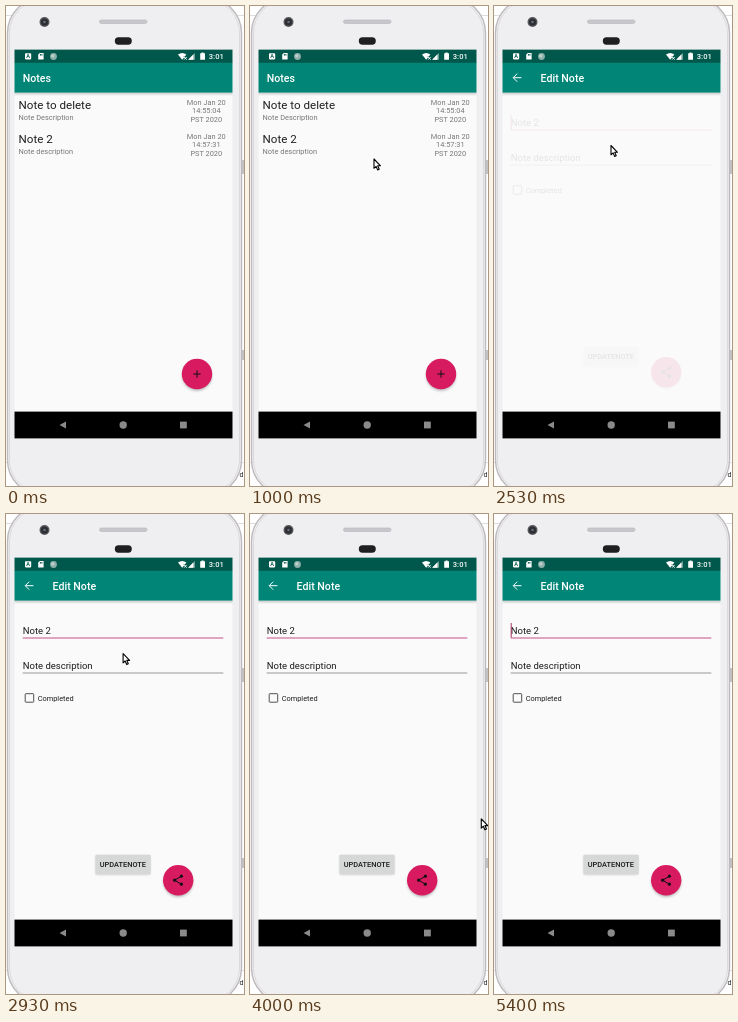
An HTML page that plays this animation: 238x480 px, repeating every 5.47 s.

```html
<!DOCTYPE html>
<html lang="en">
<head>
<meta charset="utf-8">
<title>Notes</title>
<style>
  html, body { margin: 0; width: 100%; height: 100%; overflow: hidden; background: #fff; }
  svg { display: block; width: 238px; height: 480px; font-family: Roboto, "Noto Sans", sans-serif; }
  .bar { font-size: 10.6px; font-weight: 500; fill: #fff; }
  .head { font-size: 11.6px; fill: #202020; }
  .small { font-size: 7.4px; fill: #777; }
  .mid { text-anchor: middle; }
  .field { font-size: 9.5px; fill: #1c1c1c; }
  .dark { fill: #1c1c1c; }
  .line { fill: none; stroke-width: 1; }
</style>
</head>
<body>
<svg viewBox="0 0 238 480">
  <defs>
    <filter id="soft" x="-50%" y="-50%" width="200%" height="200%"><feGaussianBlur stdDeviation="1.4"/></filter>
    <linearGradient id="drop" x2="0" y2="1">
      <stop stop-opacity=".2"/>
      <stop offset="1" stop-opacity="0"/>
    </linearGradient>
    <g id="fab">
      <circle cy="2" r="14.5" fill="#000" opacity=".3" filter="url(#soft)"/>
      <circle r="15.2" fill="#d81b60"/>
    </g>
  </defs>

  <!-- desktop behind the phone -->
  <path class="line" stroke="#ddd" d="M0 9.5H12M225 9.5H238M0 456.5H8M230 456.5H238"/>
  <path class="line" stroke="#888" d="M237 154V168M237 344V354"/>
  <text x="233.5" y="471" font-size="7" fill="#222">d</text>

  <!-- phone -->
  <rect x="1.5" y="-8" width="234" height="497" rx="35" fill="#efeff1" stroke="#bdb9bd" stroke-width="1.4"/>
  <rect x="3.5" y="-6" width="230" height="493" rx="33" fill="none" stroke="#dcd9dd"/>
  <rect x="93.5" y="14" width="47.5" height="3.4" rx="1.7" fill="#c9c9cd" stroke="#b2b2b6" stroke-width=".6"/>
  <circle cx="38.5" cy="16" r="5" fill="#58585c"/>
  <circle cx="38.5" cy="16" r="3.6" fill="#2c2e34"/>
  <circle cx="38.5" cy="16" r="1.3" fill="#666b78"/>
  <rect x="108.8" y="31.3" width="17" height="7.4" rx="3.7" fill="#1f1f22"/>

  <!-- screen -->
  <rect x="8.5" y="43.6" width="218" height="388.8" fill="#fafafa"/>
  <rect x="8.5" y="86.5" width="218" height="3.5" fill="url(#drop)"/>
  <rect x="8.5" y="43.6" width="218" height="13.4" fill="#00574b"/>
  <rect x="8.5" y="56.8" width="218" height="29.8" fill="#008577"/>
  <rect x="8.5" y="405.6" width="218" height="26.8" fill="#000"/>
  <path d="M60 415.5V422.5L53.5 419Z" fill="#8a8a8a"/>
  <circle cx="117.2" cy="419" r="3.7" fill="#8a8a8a"/>
  <rect x="174" y="415.6" width="6.8" height="6.8" fill="#8a8a8a"/>

  <!-- status icons -->
  <rect x="19" y="47.2" width="6.2" height="6.2" rx=".8" fill="#fff"/>
  <text class="mid" x="22.1" y="52.4" font-size="5.5" font-weight="700" fill="#00574b">A</text>
  <path d="M33.8 47H37.6V53.6H32.2V48.6Z" fill="#fff"/>
  <path class="line" stroke="#00574b" stroke-width=".6" d="M34.4 48V49.6M35.9 48V49.6"/>
  <circle cx="47.5" cy="50.5" r="3.4" fill="#8fb0aa"/>
  <circle cx="46.8" cy="49.8" r="1.6" fill="#bfd2ce"/>
  <path d="M172 48.6Q176.2 45.4 180.4 48.6L176.2 53.8Z" fill="#fff"/>
  <path class="line" stroke="#00574b" stroke-width="2" d="M178 50.5L181 54"/>
  <path class="line" stroke="#fff" stroke-width=".8" d="M178.2 51L180.6 53.6M180.6 51L178.2 53.6"/>
  <path d="M188.8 47V53.8H182.2Z" fill="#8fb0aa"/>
  <path d="M187.3 48.5V53.8H182.2Z" fill="#fff"/>
  <path d="M195.6 46.4H197.6V47.2H199V53.8H194.2V47.2H195.6Z" fill="#fff"/>
  <text x="202.8" y="53.3" font-size="7.6" font-weight="500" fill="#fff">3:01</text>

  <g id="listBar"><text class="bar" x="16.7" y="76">Notes</text></g>
  <g id="editBar">
    <path class="line" stroke="#fff" stroke-width="1.3" d="M27.4 71.7H19.4M23.2 67.7L19.2 71.7L23.2 75.7"/>
    <text class="bar" x="46.6" y="76">Edit Note</text>
  </g>

  <g id="list">
    <g id="rows"></g>
    <use href="#fab" x="191" y="368"/>
    <path class="line" stroke="#111" stroke-width="1.1" d="M187.3 368H194.7M191 364.3V371.7"/>
  </g>

  <g id="edit">
    <text class="field" x="16.7" y="120">Note 2</text>
    <path class="line" stroke="#c4508c" stroke-width="1.6" d="M16.7 124H217.3"/>
    <path id="caret" class="line" stroke="#a8325f" stroke-width="1.1" d="M17.2 109V123.5"/>
    <text class="field" x="16.7" y="155">Note description</text>
    <path class="line" stroke="#999" stroke-width=".8" d="M16.7 159H217.3"/>
    <rect class="line" x="19.2" y="179.7" width="8.5" height="8.5" rx=".6" stroke="#505050"/>
    <text class="small dark" x="31.7" y="186.6">Completed</text>
    <rect x="90" y="342" width="54" height="18.5" rx="1" fill="#000" opacity=".18" filter="url(#soft)"/>
    <rect x="89.4" y="340.8" width="55.2" height="19.8" rx="1" fill="#d6d7d7"/>
    <text class="small dark mid" x="116.8" y="353.4" font-weight="500">UPDATENOTE</text>
    <use href="#fab" x="172.2" y="366.2"/>
    <path class="line" stroke="#111" d="M175.4 362.2L168.6 366.2L175.4 370.2"/>
    <g fill="#111">
      <circle cx="175.4" cy="362.2" r="1.6"/>
      <circle cx="168.6" cy="366.2" r="1.6"/>
      <circle cx="175.4" cy="370.2" r="1.6"/>
    </g>
  </g>

  <path id="cursor" d="M.5 .5V9.8L2.6 7.9L4.1 11.4L5.7 10.7L4.2 7.3H7Z" fill="#fff" stroke="#000" stroke-width="1.1" stroke-linejoin="round"/>
</svg>
<script>
const LOOP = 5470, FRAMES = 82, STEP = LOOP / FRAMES;
const OPEN = 2400;
const $ = id => document.getElementById(id);

const notes = [
  { y: 103, title: "Note to delete", text: "Note Description", time: "14:55:04" },
  { y: 137, title: "Note 2", text: "Note description", time: "14:57:31" }
];
const label = (cls, x, y, s) => `<text class="${cls}" x="${x}" y="${y}">${s}</text>`;
$("rows").innerHTML = notes.map(n =>
  label("head", 12.6, n.y, n.title) +
  label("small", 12.6, n.y + 11.2, n.text) +
  ["Mon Jan 20", n.time, "PST 2020"].map((s, i) =>
    label("small mid", 200.3, n.y - 4.2 + i * 8.6, s)).join("")
).join("");

// pointer path: time, x, y
const path = [
  [270, 240, 400], [600, 205, 300], [800, 160, 205], [1000, 123.5, 152.5],
  [1400, 116, 143], [1870, 116, 140], [2070, 116.5, 139], [2930, 116.5, 139],
  [3130, 165, 175], [3330, 241, 245], [3600, 241, 330], [3900, 232, 310],
  [4200, 227.5, 289], [4530, 227.5, 289], [4870, 241, 300]
];
const clamp = v => Math.min(1, Math.max(0, v));
const span = (t, a, b) => clamp((t - a) / (b - a));
const smooth = u => u * u * (3 - 2 * u);

function pointer(t) {
  const i = path.findIndex(p => p[0] > t);
  if (i < 1) return [-50, -50];
  const [t0, x0, y0] = path[i - 1], [t1, x1, y1] = path[i];
  const u = smooth(span(t, t0, t1));
  return [x0 + (x1 - x0) * u, y0 + (y1 - y0) * u];
}

function draw(ms) {
  const t = Math.floor((ms % LOOP + 5) / STEP) * STEP;
  const editing = t >= OPEN - 5;
  $("listBar").style.display = editing ? "none" : "";
  $("editBar").style.display = editing ? "" : "none";
  $("list").style.opacity = 1 - span(t, OPEN - 50, OPEN + 110);
  $("edit").style.opacity = span(t, OPEN, OPEN + 470) ** 1.9;
  $("caret").style.opacity = (t + 605) % 1000 < 500 ? 1 : 0;
  const [x, y] = pointer(t);
  $("cursor").setAttribute("transform", `translate(${x} ${y})`);
}

const start = performance.now();
function tick() {
  draw(performance.now() - start);
  requestAnimationFrame(tick);
}
tick();
</script>
</body>
</html>
```
